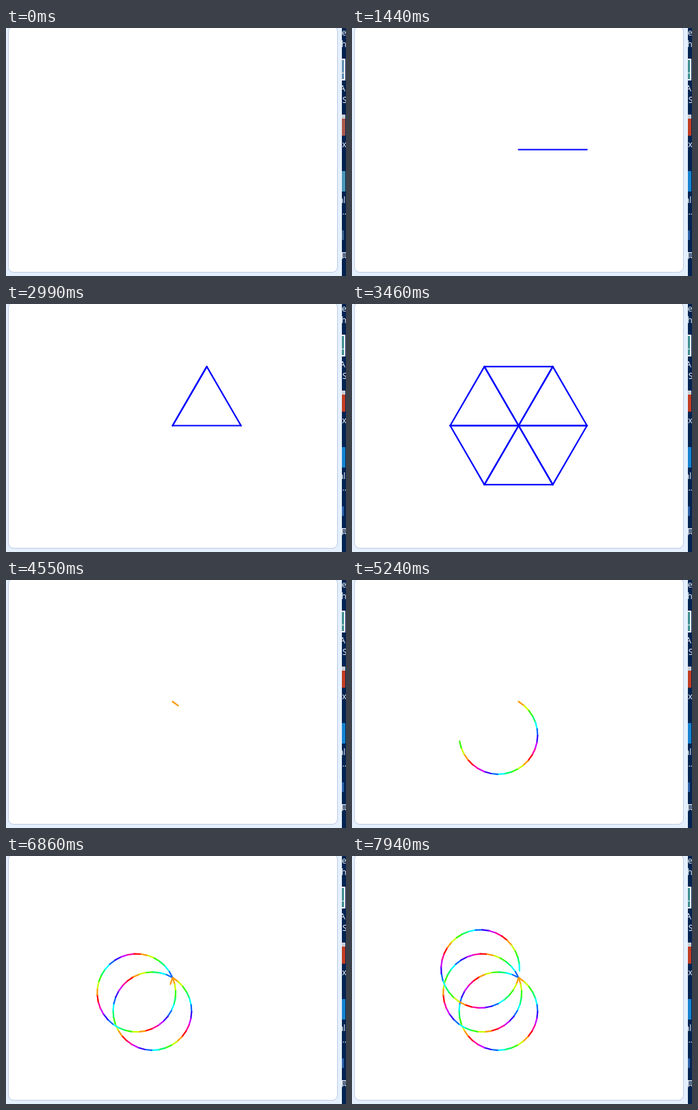
Animation of 497 by 364 pixels, one loop 8000 ms. Source, as an HTML page with a canvas:

```html
<!DOCTYPE html>
<html lang="en">
<head>
<meta charset="utf-8">
<title>Pen drawings</title>
<style>
  html, body { margin: 0; width: 100%; height: 100%; overflow: hidden; background: #e5f0ff; }
  body { position: relative; }
  #stage {
    position: absolute; left: 3px; top: -3px; width: 482px; height: 362px;
    box-sizing: border-box; background: #fff; border: 1px solid #bccbe2; border-radius: 8px;
  }
  canvas { position: absolute; left: 0; top: 0; }
  #desk {
    position: absolute; left: 491px; top: 0;
    --bg: #032452; --teal: #3f8f90; --red: #c23d22; --blue: #1683d0; --small: #2d62a8;
  }
  #desk.dim { --bg: #03224f; --teal: #6091b4; --red: #ac594c; --blue: #4a97b6; --small: #3c658c; }
  #desk text { font: 12px "Open Sans", "Noto Sans", "Noto Sans CJK SC", sans-serif; fill: #fff; text-anchor: middle; }
</style>
</head>
<body>
<div id="stage"></div>
<svg id="desk" width="6" height="364" viewBox="491 0 6 364">
  <rect x="491" width="6" height="364" fill="var(--bg)"/>
  <rect x="485" y="46" width="10" height="30" fill="var(--teal)" stroke="#fff" stroke-width="2"/>
  <path d="M491 66h4" stroke="#fff"/>
  <rect x="485" y="128" width="11" height="30" fill="var(--red)"/>
  <rect x="485" y="127" width="11" height="6" fill="#c9cdd2"/>
  <rect x="485" y="210" width="11" height="30" fill="var(--blue)"/>
  <rect x="489" y="297" width="5" height="14" fill="var(--small)"/>
  <text x="494" y="11">e</text>
  <text x="494" y="28">h</text>
  <text x="492" y="93">A</text>
  <text x="495" y="110">S</text>
  <text x="494.5" y="175">x</text>
  <text x="491.5" y="257">al</text>
  <text x="493" y="274">...</text>
  <text x="494.5" y="339">具</text>
</svg>
<canvas id="pen" width="497" height="364"></canvas>
<script>
const LOOP = 8000, HOME = { x: 243.5, y: 178.5 };
const desk = document.getElementById('desk');
const ctx = document.getElementById('pen').getContext('2d');
ctx.lineWidth = 2.2;
ctx.lineCap = 'round';

const blue = () => '#00f';
const rainbow = i => `hsl(${36 * (i + 1) % 360} 100% 50%)`;

// turn: after each side; spin: between shapes; first: sides present at the start
const acts = [
  { at: 1440, tick: 80, first: 1, sides: 4, copies: 4, len: 100, turn: -90, spin: -90, head: 0, color: blue },
  { at: 2990, tick: 78.3, first: 4, sides: 3, copies: 6, len: 100, turn: -120, spin: -60, head: 0, color: blue },
  { at: 4550, tick: 77.05, first: 1, sides: 36, copies: 10, len: 10, turn: 10, spin: 36, head: 36, color: rainbow }
];

function sideCount(act, t) {
  const k = Math.floor((t - act.at + 9) / act.tick);
  const n = act.first + Math.min(3 * k, Math.floor(2.381 * k + 1.3));
  return Math.min(n, act.sides * act.copies);
}

function draw(act, count) {
  let x, y;
  for (let n = 0; n < count; n++) {
    const i = n % act.sides, copy = Math.floor(n / act.sides);
    if (i === 0) ({ x, y } = HOME);
    const a = (act.head + copy * act.spin + i * act.turn) * Math.PI / 180;
    ctx.strokeStyle = act.color(i);
    ctx.beginPath();
    ctx.moveTo(x, y);
    x += act.len * Math.cos(a);
    y += act.len * Math.sin(a);
    ctx.lineTo(x, y);
    ctx.stroke();
  }
}

function render(t) {
  desk.classList.toggle('dim', t < 1210);
  ctx.clearRect(0, 0, 497, 364);
  const act = acts.filter(a => t >= a.at).pop();
  if (act) draw(act, sideCount(act, t));
}

const start = performance.now();
function frame() {
  render((performance.now() - start) % LOOP);
  requestAnimationFrame(frame);
}
frame();
</script>
</body>
</html>
```
